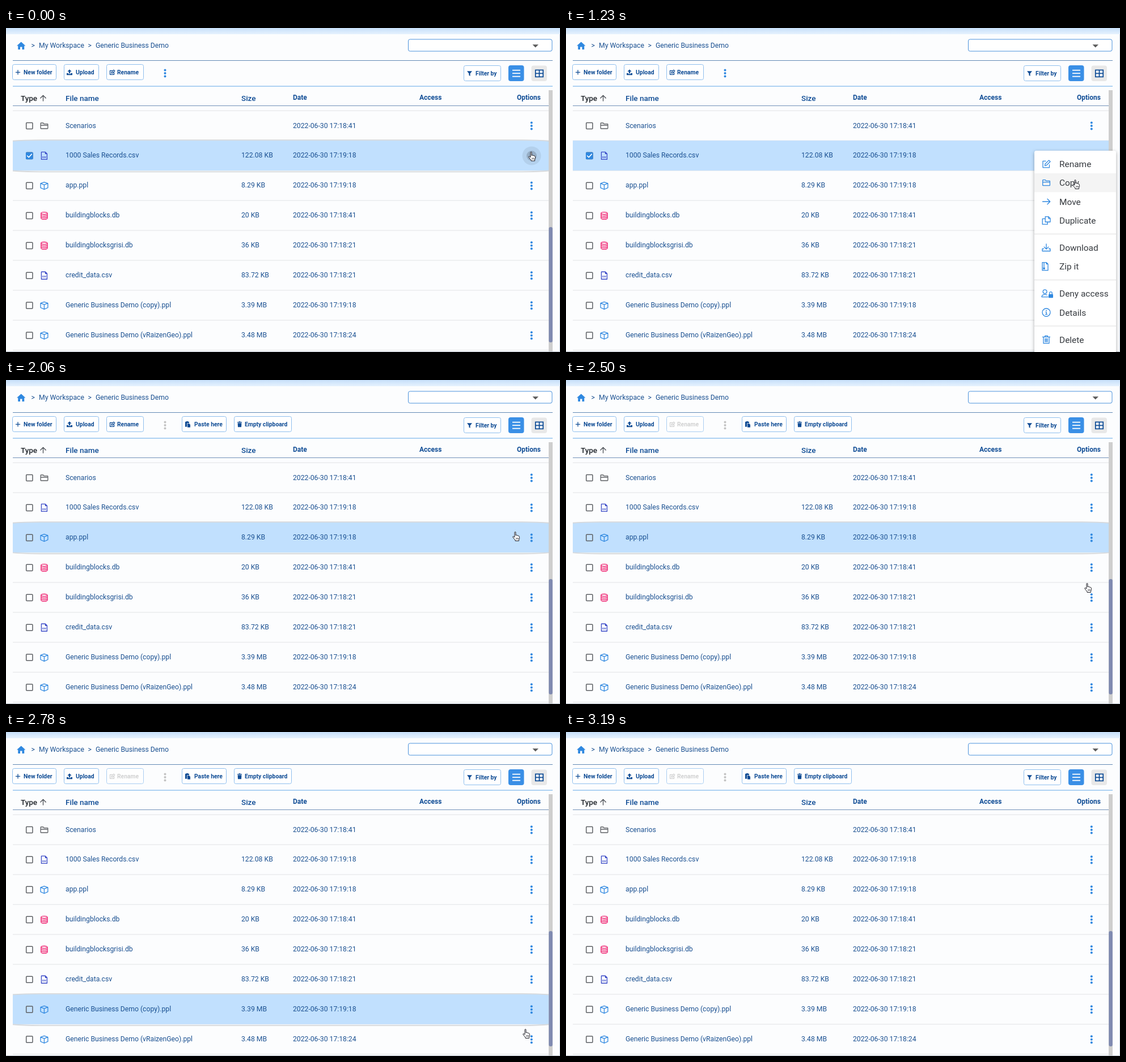
Animation of 977x573 px, one loop 3.46 s. Source, as an HTML page:

```html
<!DOCTYPE html>
<html lang="en">
<head>
<meta charset="utf-8">
<title>File manager</title>
<style>
html, body { margin: 0; width: 100%; height: 100%; overflow: hidden; background: #fcfdfe; }
svg { display: block; width: 977px; height: 573px; font-family: Roboto, sans-serif; }
.cell { font-size: 12.2px; fill: #1a5091; }
.head { font-size: 13.5px; font-weight: 500; fill: #0f4c95; }
.sub { font-size: 12px; font-weight: 700; fill: #0f4c95; }
.btn { font-size: 10.35px; font-weight: 700; }
.item { font-size: 15.45px; fill: #363a3f; }
.line { fill: none; stroke-width: 1.3; stroke-linejoin: round; stroke-linecap: round; }
</style>
</head>
<body>
<svg id="stage" viewBox="0 0 977 573">
  <defs>
    <linearGradient id="strip" x2="0" y2="1">
      <stop stop-color="#c6dff9"/><stop offset="1" stop-color="#e6f2fe"/>
    </linearGradient>
    <filter id="shadow" x="-20%" y="-10%" width="140%" height="120%">
      <feDropShadow dx="0" dy="2" stdDeviation="3" flood-color="#000" flood-opacity=".32"/>
    </filter>
    <clipPath id="copyClip"><rect x="826" y="257" width="144" height="33.5"/></clipPath>
  </defs>
  <rect width="977" height="573" fill="#fcfdfe"/>
  <rect width="977" height="11" fill="url(#strip)"/>
  <g id="chrome"></g>
  <g id="list"></g>
  <g id="menu"></g>
  <g id="cursor">
    <path d="M4 1.6Q4 .6 5 .6T6 1.6V7Q6.3 6 7.3 6.2 8.2 6.4 8.2 7.2 9 6.5 9.8 7 10.4 7.3 10.4 8 11.3 7.6 12 8.2 12.5 8.6 12.5 9.5V11.5Q12.5 13 11.5 14.5V16.5H5V15Q3 13 1 10 .4 9 1.2 8.6 2.2 8.2 4 10.2Z"
      fill="#fff" stroke="#1c1c24" stroke-linejoin="round"/>
    <path d="M6.8 11V14M8.6 11V14M10.4 11V14" stroke="#1c1c24" stroke-width=".7"/>
  </g>
</svg>
<script>
const LOOP = 3460, ROW = 52.95, TOP = 146.2, BLUE = '#2f88e0', NAVY = '#0f4c95';
const $ = id => document.getElementById(id);
const text = (x, y, s, cls, more = '') => `<text x="${x}" y="${y}" class="${cls}" ${more}>${s}</text>`;
const rect = (x, y, w, h, more) => `<rect x="${x}" y="${y}" width="${w}" height="${h}" ${more}/>`;
const line = (x1, x2, y, color, w = 1) => `<path d="M${x1} ${y}H${x2}" stroke="${color}" stroke-width="${w}"/>`;
const outline = (d, color, more = '') => `<path class="line" d="${d}" stroke="${color}" ${more}/>`;
const solid = (d, color) => `<path d="${d}" fill="${color}"/>`;
const at = (x, y, body, more = '') => `<g transform="translate(${x} ${y})" ${more}>${body}</g>`;
const dots = (x, y, color, id = '') =>
  `<g ${id} fill="${color}">${[-5.5, 0, 5.5].map(d => `<circle cx="${x}" cy="${y + d}" r="2"/>`).join('')}</g>`;

// Icons are centred on their own origin.
const pencil = color => outline('M0-3H-3.5V4H3.5V.5M-1 1.5L-.6-.6 3-4.2 4.8-2.4 1.2 1.2Z', color);
const folder = color => outline('M-6.3 4.5V-4.2Q-6.3-5-5.5-5H-1.8L-.3-3.3H5.6Q6.4-3.3 6.4-2.5V4.2Q6.4 5 5.6 5H-5.5Q-6.3 5-6.3 4.5ZM-6.3-1H6.4', color);
const trash = solid('M-4-4H-1.4V-5H1.4V-4H4V-2.8H-4ZM-3.4-2H3.4L3 5H-3Z', NAVY);
const icons = {
  folder: folder('#5c5f63'),
  csv: outline('M-5 6.5V-6.5H2L5-3.5V6.5ZM2-6.5V-3.5H5', '#3949c6') +
    '<text y="3.6" font-size="4.6" font-weight="700" fill="#3949c6" text-anchor="middle">csv</text>',
  ppl: outline('M0-6.3L6.4-4V3.8L0 6.6-6.4 3.8V-4ZM-6.4-4L0-1.5 6.4-4M0-1.5V6.6', BLUE),
  db: outline('M-5.6-4.2C-5.6-7 5.6-7 5.6-4.2S-5.6-1.4-5.6-4.2V4.4C-5.6 7.2 5.6 7.2 5.6 4.4V-4.2M-5.6-1.2C-5.6 1.6 5.6 1.6 5.6-1.2M-5.6 1.7C-5.6 4.5 5.6 4.5 5.6 1.7', '#ee1a6b')
};

const button = (x, y, w, label, textX, icon, id = '', color = NAVY) =>
  `<g ${id}>${rect(x + .5, y + .5, w, 27, 'rx="3" fill="#fff" stroke="#8fbfee"')}` +
  text(textX, y + 17.7, label, 'btn', `fill="${color}"`) + at(x + 10, y + 14.3, icon) + '</g>';

$('chrome').innerHTML =
  solid('M19 31.5L26.7 24.5 34.4 31.5H32.2V38H28.4V33.5H25V38H21.2V31.5Z', BLUE) +
  text(44.5, 35.2, '&gt;', 'cell') + text(58, 35.2, 'My Workspace', 'cell') +
  text(144.5, 35.2, '&gt;', 'cell') + text(158, 35.2, 'Generic Business Demo', 'cell') +
  rect(709.5, 20, 253.5, 21, 'rx="3" fill="#fff" stroke="#4b92dc"') +
  solid('M928.5 29.2H939L933.7 34.5Z', '#5b5b5b') +
  line(12, 964, 57.5, '#6189b4') + line(12, 964, 103, '#62a8ea', 1.2) +
  button(11, 64, 77, 'New folder', 31, outline('M-3.6 0H3.6M0-3.6V3.6', NAVY)) +
  button(102, 64, 61, 'Upload', 123,
    solid('M0-5L3.6-1.2H1.2V2H-1.2V-1.2H-3.6ZM-5 1.5H-2.4V3H2.4V1.5H5V5H-5Z', NAVY)) +
  button(177, 64, 65, 'Rename', 196, pencil(NAVY), 'id="renameOn"') +
  button(177, 64, 65, 'Rename', 196, pencil('#c3c3c3'), 'id="renameOff"', '#c3c3c3') +
  dots(280.5, 80, BLUE, 'id="more"') +
  '<g id="clipboard">' +
  button(310, 64, 78, 'Paste here', 332,
    solid('M-4-4.5H-2V-5.3H1V-4.5H3V-2H-.8V4.5H-4ZM0-1.2H3L5 .8V5.5H0Z', NAVY)) +
  button(402, 64, 101, 'Empty clipboard', 421, trash) + '</g>' +
  button(807, 66, 65, 'Filter by', 828, solid('M-4-4H5L1.6.2V4.6L-.6 3.2V.2Z', NAVY)) +
  rect(886, 66, 27.5, 28, 'rx="4" fill="#3a8fe6"') +
  [74.7, 80.2, 85.7].map(y => line(893, 907, y, '#fff', 1.8)).join('') +
  rect(926.5, 66.5, 27.5, 27.5, 'rx="4" fill="#e8e8e8"') +
  `<path d="M933.8 74.4H947.2V86.4H933.8ZM940.5 74.4V86.4M933.8 80.4H947.2" fill="#fff" stroke="${NAVY}" stroke-width="1.8"/>` +
  text(26, 129, 'Type', 'head', 'style="fill:#20252b"') +
  outline('M65.5 129V119.5M60.8 124L65.5 119.3 70.2 124', '#4b4f55') +
  text(105, 129, 'File name', 'head') + text(415, 129, 'Size', 'head') +
  text(506, 127.2, 'Date', 'sub') + text(729, 127.2, 'Access', 'sub') + text(901, 127.2, 'Options', 'sub') +
  line(12, 957, 137.5, '#7191b8') +
  rect(957, 110, 7, 463, 'fill="#cecece"') +
  rect(957.3, 352, 6.6, 204, 'rx="3.3" fill="#7f8ab0"') +
  line(0, 977, 572.5, '#b9c1cb') + '<path d="M976.5 11V573" stroke="#cbd5e2"/>';

const files = [
  ['Scenarios', '', '18:41', 'folder'],
  ['1000 Sales Records.csv', '122.08 KB', '19:18', 'csv'],
  ['app.ppl', '8.29 KB', '19:18', 'ppl'],
  ['buildingblocks.db', '20 KB', '18:41', 'db'],
  ['buildingblocksgrisi.db', '36 KB', '18:21', 'db'],
  ['credit_data.csv', '83.72 KB', '18:21', 'csv'],
  ['Generic Business Demo (copy).ppl', '3.39 MB', '19:18', 'ppl'],
  ['Generic Business Demo (vRaizenGeo).ppl', '3.48 MB', '18:24', 'ppl']
];
const rowTop = i => TOP + i * ROW;
const edge = (y, bend) => `M12 ${y}Q30 ${y + bend} 60 ${y + bend}H910Q940 ${y + bend} 957 ${y}`;

$('list').innerHTML =
  files.map((_, i) => line(12, 957, rowTop(i), '#e1e3e5')).join('') + line(12, 957, rowTop(8), '#e1e3e5') +
  `<g id="band">${rect(12, 0, 945, ROW, 'fill="#c1e0fe"')}
    <g id="lift" fill="none" stroke="#d6d9dc" stroke-width="1.8">
      <path d="${edge(.8, -1.8)}"/><path d="${edge(ROW + .4, 1.8)}"/></g></g>` +
  files.map(([name, size, time, icon], i) => {
    const y = rowTop(i) + 26.8, base = y + 3.5;
    return rect(35.7, y - 5.6, 11.2, 11.2, 'rx="1" fill="none" stroke="#5d6064" stroke-width="1.5"') +
      at(67.4, y, icons[icon]) + text(105, base, name, 'cell') + text(415, base, size, 'cell') +
      text(506, base, '2022-06-30 17:' + time, 'cell') + dots(926.8, y, BLUE, i == 1 ? 'id="rowDots"' : '');
  }).join('') +
  at(41.3, rowTop(1) + 26.8, rect(-6.3, -6.3, 12.6, 12.6, `rx="1.5" fill="${BLUE}"`) +
    outline('M-3.7.2L-1.1 2.8 3.9-2.8', '#fff', 'style="stroke-width:1.6"'), 'id="check"') +
  '<g id="press"><circle cx="927" cy="226" r="16.5" fill="#000" opacity=".07"/><circle id="pressCore" cx="927" cy="226" r="9" fill="#000" opacity=".16"/></g>';

const MENU = [
  ['Rename', 240.3, outline('M-1-5H-6V6.5H5.5V1.5M-2.5 3L-2 .2 4.6-6.4 7-4 .4 2.5Z', BLUE)],
  ['Copy', 273.7, at(0, 0, folder(BLUE), 'transform-origin="0 0"')],
  ['Move', 307, outline('M-6.5 0H6.5M2-4.8L6.7 0 2 4.8', BLUE)],
  ['Duplicate', 340.4, outline('M-1.8-6.8H4L7-3.8V2.6H-1.8ZM3.8-6.8V-3.6H7M-2-3H-6.8V6.8H2.2V2.8', BLUE)],
  ['Download', 388.3, outline('M0-6.5V2.5M-3.8-1L0 2.8 3.8-1M-4.5 2.2H-7V6.2H7V2.2H4.5', BLUE)],
  ['Zip it', 421.7, at(-2, 0, outline('M-5-7H2.3L5-4.3V7H-5ZM2.3-7V-4.3H5', BLUE) +
    `<path d="M-2-6V1" stroke="${BLUE}" stroke-width="2.2" stroke-dasharray="1.5 1"/>` + rect(-3.6, 1.5, 3.2, 3.8, `fill="${BLUE}"`))],
  ['Deny access', 469.7, outline('M1-3.5A3.4 3.4 0 1 1-5.8-3.5 3.4 3.4 0 1 1 1-3.5ZM3 6H-8Q-8 1.6-2.4 1.6-.5 1.6 1 2.2', BLUE) +
    rect(4, 1, 8, 6.5, `rx="1" fill="${BLUE}"`) + outline('M5.8 1V-1Q5.8-3 8-3T10.2-1V1', BLUE)],
  ['Details', 503, `<circle r="7" class="line" stroke="${BLUE}"/>` + outline('M-1-.6H.2V3.4M-1.4 3.4H1.6', BLUE) +
    `<circle cy="-3.3" r="1" fill="${BLUE}"/>`],
  ['Delete', 551, outline('M-6.5-4.6H6.5M-2.3-4.8V-6.6H2.3V-4.8M-5-4.4V6.7H5V-4.4M-2-1.8V4.2M0-1.8V4.2M2-1.8V4.2', BLUE)]
];
$('menu').innerHTML =
  rect(826, 217, 144, 359, 'rx="3.5" fill="#fff" filter="url(#shadow)"') +
  rect(826, 0, 144, 33.4, 'id="hover" fill="#f4f4f4"') +
  [364.3, 445.6, 527].map(y => line(826, 970, y, '#dedede')).join('') +
  MENU.map(([label, y, icon]) => at(847, y, icon) + text(870, y + 5.5, label, 'item')).join('') +
  '<circle id="ripple" cx="896.5" cy="270" r="16.5" fill="#000" opacity=".17" clip-path="url(#copyClip)"/>';

// Each step list holds [start time, ...values]; the latest started step applies.
const pick = (steps, t) => steps.filter(s => s[0] <= t).pop();
const POINTER = [[0, 921, 218.5], [530, 916, 230], [660, 908, 243], [820, 879, 262], [950, 894, 268],
  [1230, 893, 268], [2350, 894, 278], [2500, 914, 359], [2640, 913, 440], [2780, 911, 525],
  [2930, 911, 551], [3050, 911, 600]];
const BAND = [[0, 1, true], [130, 1, false], [2060, 2, true], [2640, 5, true], [2780, 6, true],
  [2930, 7, true], [3190, -1, false]];
const RENAME = [[0, 1], [2200, .4], [2350, 0]];

const show = (id, on) => $(id).setAttribute('visibility', on ? 'visible' : 'hidden');
const set = (id, name, value) => $(id).setAttribute(name, value);

function draw(t) {
  const [, x, y] = pick(POINTER, t);
  set('cursor', 'transform', `translate(${x} ${y})`);

  const [, row, lifted] = pick(BAND, t);
  show('band', row >= 0);
  set('band', 'transform', `translate(0 ${rowTop(row)})`);
  set('lift', 'opacity', lifted ? 1 : 0);

  const copied = t >= 2060, opening = t < 280;
  show('check', !copied);
  show('rowDots', copied);
  show('press', t < 530);
  set('pressCore', 'opacity', t < 130 ? .16 : 0);

  show('menu', t >= 130 && !copied);
  set('menu', 'opacity', opening ? .7 : 1);
  set('menu', 'transform', opening ? 'translate(970 217) scale(.875) translate(-970 -217)' : '');
  set('hover', 'y', t < 820 ? 223.6 : 257);
  set('ripple', 'opacity', t >= 1930 && !copied ? .17 : 0);

  const [, active] = pick(RENAME, t);
  set('renameOn', 'opacity', active);
  set('renameOff', 'opacity', active ? 0 : .75);
  set('more', 'fill', copied ? '#c3c3c3' : BLUE);
  show('clipboard', copied);
}

function tick(now) {
  draw(now % LOOP);
  requestAnimationFrame(tick);
}
draw(0);
requestAnimationFrame(tick);
</script>
</body>
</html>
```
